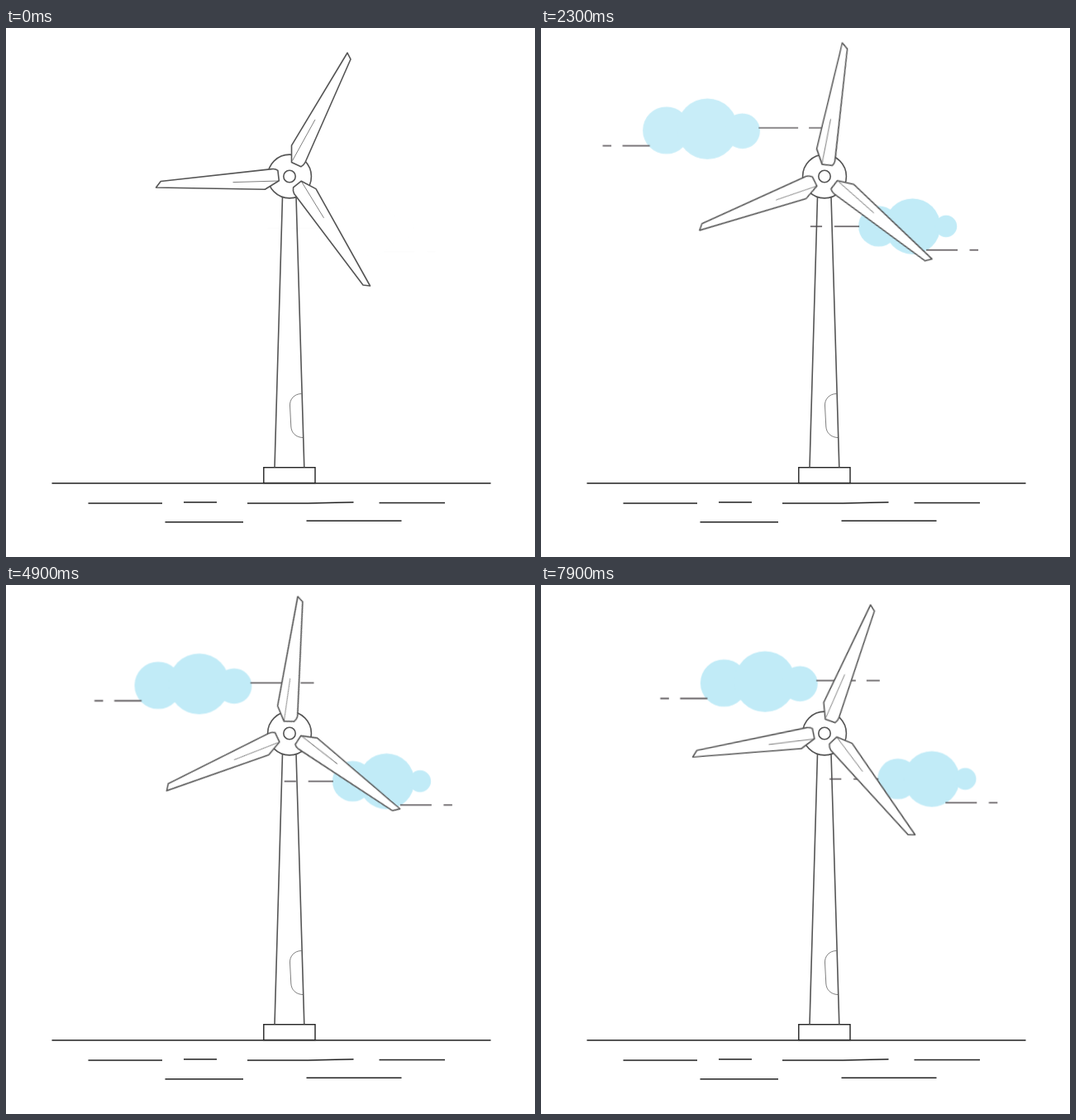
Write an HTML page without scripts that moves like this. It is 640 by 640 pixels and loops after 8 s.

```html
<!DOCTYPE html>
<html lang="en">
<head>
<meta charset="utf-8">
<title>Wind turbine</title>
<style>
  html, body { margin: 0; width: 100%; height: 100%; overflow: hidden; background: #fff; }
  svg { display: block; width: 100vw; height: 100vh; }
  path, line, rect, circle { fill: none; stroke: #555; stroke-width: 1.6; }
  .ground * { stroke: #222; stroke-width: 1.4; }
  .thin { stroke-width: .75; }
  .solid { fill: #fff; }
  .cloud circle { fill: #c1ebf7; stroke: none; }
  .cloud path { stroke: #524d50; }

  /* Motion is held for 100 ms; every second pose comes 80 ms after the first. */
  .spin, .spin-tick { transform-origin: 343.1px 178.8px; }
  .spin { animation: spin 8s steps(40) -5ms infinite; }
  .spin-tick { animation: spin-tick .2s step-end -5ms infinite; }
  .drift { animation: drift 8s steps(40) -5ms infinite; }
  .drift-tick { animation: drift-tick .2s step-end -5ms infinite; }

  .left { --x0: -52.3px; --y0: 3.9px; --x1: 47.3px; --y1: -3.5px; --dx: 1px; --dy: -.07px;
          animation: fade-left 8s -5ms infinite; }
  .right { --x0: -17.4px; --y0: 3.9px; --x1: 15.8px; --y1: -3.6px; --dx: .33px; --dy: -.08px;
           animation: fade-right 8s -5ms infinite; }

  @keyframes spin { to { transform: rotate(360deg); } }
  @keyframes spin-tick { 50%, 100% { transform: rotate(3.6deg); } }
  @keyframes drift {
    from { transform: translate(var(--x0), var(--y0)); }
    to { transform: translate(var(--x1), var(--y1)); }
  }
  @keyframes drift-tick {
    0% { transform: translate(0, 0); }
    50%, 100% { transform: translate(var(--dx), var(--dy)); }
  }
  @keyframes fade-left {
    0% { opacity: 0; }
    2.5% { opacity: 0; animation-timing-function: steps(24); }
    32.5%, 100% { opacity: 1; }
  }
  @keyframes fade-right {
    0% { opacity: .01; animation-timing-function: steps(12); }
    15%, 100% { opacity: 1; }
  }
</style>
</head>
<body>
<svg viewBox="0 0 640 640" xmlns="http://www.w3.org/2000/svg">
  <g class="ground">
    <path d="M55.5 550.7H586.5"/>
    <path d="M99.5 575H189M215 573.8H255M292 575H365L420.5 573.8M451.5 574.5H531M192.5 597.7H287M363.5 596.2H478.5"/>
    <rect x="311.8" y="531.7" width="62.2" height="18.8"/>
  </g>

  <path d="M334.5 204L325 531.5M351 204L360.8 531.5"/>
  <path class="thin" d="M357.5 442.5C349 442.5 343 449 343.5 457L344.8 482C345.2 490 351 495.3 359 495.5"/>

  <g class="cloud left"><g class="drift"><g class="drift-tick">
    <circle cx="175.6" cy="122" r="28.6"/>
    <circle cx="225.2" cy="120.3" r="36.8"/>
    <circle cx="267.5" cy="122.8" r="21.4"/>
    <path d="M98.5 140.6H109M122.5 140.6H155.5M287.3 119H335M348 119H364"/>
  </g></g></g>

  <g class="cloud right"><g class="drift"><g class="drift-tick">
    <circle cx="416.5" cy="238" r="24.5"/>
    <circle cx="457.5" cy="238.2" r="33.7"/>
    <circle cx="498" cy="238" r="13.2"/>
    <path d="M333.8 238.2H348M362.8 238.2H393M474 266.7H512M526.5 266.7H537"/>
  </g></g></g>

  <circle class="solid" cx="343" cy="179.5" r="26.4"/>
  <circle cx="343" cy="179.5" r="7.2"/>

  <g class="spin"><g class="spin-tick" stroke-linejoin="round">
    <path class="solid" d="M345.5 142.2L413 30L417 37.8L362 162.5Q361 165 356.8 167.8L345.5 162.5Z"/>
    <path class="thin" d="M346.5 160.5L374 110.8"/>
    <path class="solid" d="M187.2 185.5L321.5 170.6Q326 170 328.9 172.3L330.3 184.8L313.3 195.3L181.5 193Z"/>
    <path class="thin" d="M274.5 186.6L329.5 185"/>
    <path class="solid" d="M357.3 185.2L375 194.6L440.5 312L432 311L348.6 200.5Q346.8 197.5 347.6 192.8Z"/>
    <path class="thin" d="M357.5 185.8L384.5 229.8"/>
  </g></g>
</svg>
</body>
</html>
```
